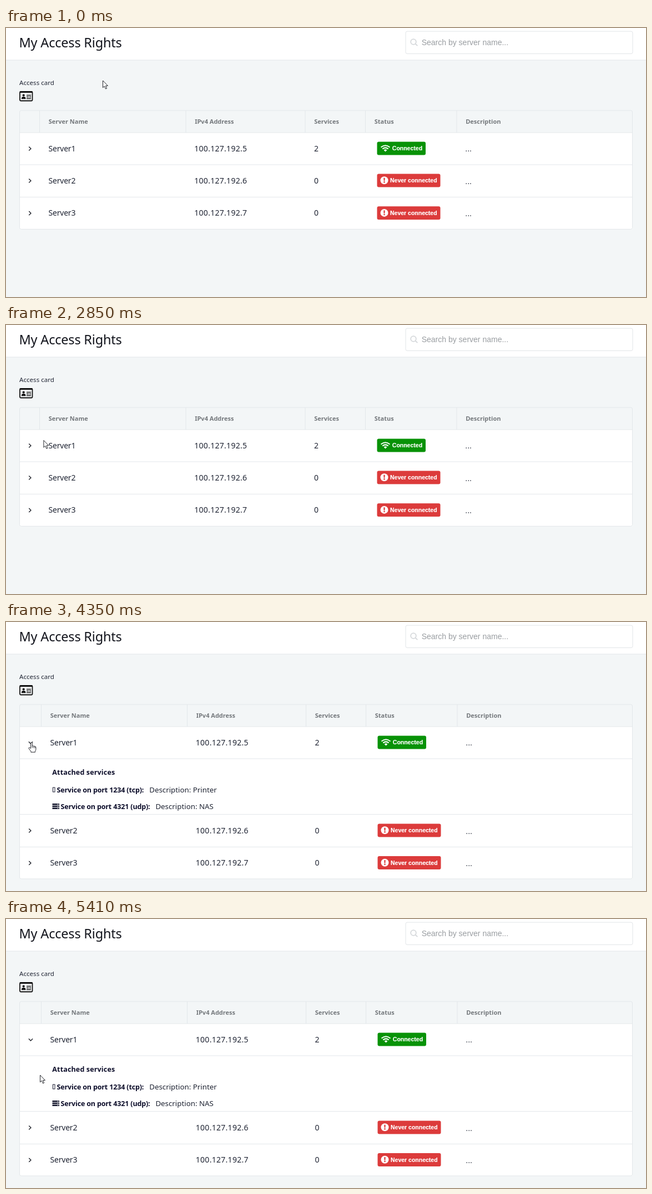
An HTML page that plays this animation: 1153x486 px, repeating every 7.05 s.

```html
<!DOCTYPE html>
<html lang="en">
<head>
<meta charset="utf-8">
<title>My Access Rights</title>
<style>
  html, body { margin: 0; width: 100%; height: 100%; overflow: hidden; background: #f3f6f7; }
  svg { display: block; width: 100%; height: 100%; }
  text { font-family: "Noto Sans", "Open Sans", sans-serif; fill: #1f2433; white-space: pre; }
  .title { font-size: 23.5px; letter-spacing: -.2px; fill: #12141c; }
  .label { font-size: 11.5px; letter-spacing: .05px; }
  .head { font-size: 11px; font-weight: 600; fill: #74787c; }
  .cell { font-size: 14px; letter-spacing: -.2px; }
  .ip { font-size: 14px; letter-spacing: .28px; }
  .dots { font: 14px "Liberation Sans", Arial, sans-serif; }
  .search { font: 14px "Liberation Sans", Arial, sans-serif; fill: #999da1; }
  .badge { font: bold 10.5px "Liberation Sans", Arial, sans-serif; fill: #fff; stroke: #fff; stroke-width: .2px; }
  .strong { font-size: 12.5px; font-weight: 600; letter-spacing: -.15px; fill: #0c0d2a; }
  .lead { font-size: 12.5px; font-weight: 600; letter-spacing: .15px; fill: #0c0d2a; }
  .desc { font-size: 13.3px; }
  .chev { fill: none; stroke: #20232b; stroke-width: 1.4; }
  .line { stroke: #e3e7ea; fill: none; }
  .cursor { fill: #fff; stroke: #23252b; stroke-width: 1; stroke-linejoin: round; }
</style>
</head>
<body>
<svg viewBox="0 0 1153 486" preserveAspectRatio="none">
  <rect width="1153" height="486" fill="#f3f6f7"/>
  <rect width="1153" height="58" fill="#fff"/>
  <path class="line" d="M0 58H1153"/>
  <text class="title" x="23.5" y="35">My Access Rights</text>
  <rect x="720" y="6" width="409" height="40.5" rx="3" fill="#fff" stroke="#e1e4e7"/>
  <g fill="none" stroke="#d5d8db" stroke-width="1.8">
    <circle cx="734" cy="25" r="4.8"/>
    <path d="M737.5 28.5L741.3 32.2"/>
  </g>
  <text class="search" x="748.7" y="31">Search by server name...</text>
  <text class="label" x="24" y="103">Access card</text>
  <g fill="#111">
    <rect x="25" y="115" width="22.5" height="16.5" rx="1.5" fill="#f8fafb" stroke="#111" stroke-width="1.8"/>
    <path d="M25 115.8H47.5" stroke="#111" stroke-width="2.4"/>
    <circle cx="31.7" cy="121.5" r="2.1"/>
    <path d="M27.8 128.2Q27.8 124 31.7 124T35.6 128.2Z"/>
    <path d="M37 121.5H45M37 124.5H41M42 124.5H45M37 127.5H45" stroke="#111" stroke-width="1.3"/>
  </g>
  <g id="table"></g>
  <g id="cursors">
    <path id="arrow" class="cursor" d="M0 0V12.8L2.9 10.1L5 15L7.1 14.1L5.1 9.4H9Z"/>
    <path id="beam" d="M-2.5 -6.5H-.8L0 -6L.8 -6.5H2.5M0 -6V6.5M-2.5 7H-.8L0 6.5L.8 7H2.5" fill="none" stroke="#23252b"/>
    <g id="hand">
      <path class="cursor" d="M-1.3 9.6V1.1Q-1.3 -.4 0 -.4T1.4 1.1V6.1Q2.6 4.9 3.9 6.4Q5.2 5.4 6.2 7Q8 6.5 8 8.6V11.6Q8 13.8 6.6 15.4V17.2H-1V15.6L-4.6 10.9Q-5.6 9.2 -4.2 8.7Q-3 8.4 -1.3 10.6Z"/>
      <path d="M1.4 6V9.4M3.9 6.6V9.6M6.2 7.2V10" fill="none" stroke="#23252b" stroke-width=".9"/>
    </g>
  </g>
</svg>
<script>
const LOOP = 7050, STEP = 1000 / 15, OPEN_AT = 3680;
const HEADS = ["Server Name", "IPv4 Address", "Services", "Status", "Description"];
const MOVES = [
  { at: 1780, steps: 22, path: [[174.5, 95], [134, 195], [45.5, 215]] },
  { at: 4280, steps: 18, path: [[45.5, 215], [51, 258.6], [61.5, 282]] }
];
const $ = id => document.getElementById(id);

const text = (cls, x, y, s) => `<text class="${cls}" x="${x}" y="${y}">${s}</text>`;
const line = d => `<path class="line" d="${d}"/>`;
const chevron = (x, y, turn = 0) =>
  `<path class="chev" transform="translate(${x} ${y}) rotate(${turn})" d="M-1.7 -3.6L1.9 0L-1.7 3.6"/>`;

function badge(x, y, on) {
  const icon = on
    ? `<g fill="none" stroke="#fff" stroke-width="2">
         <path d="M-8 -1.6Q0 -8.4 8 -1.6M-5.2 1.4Q0 -3 5.2 1.4"/></g>
       <path d="M-2.9 3.2Q0 .8 2.9 3.2L0 6.2Z" fill="#fff"/>`
    : `<circle r="7" fill="#fff"/>
       <path d="M-1.3 -4.5H1.3L.9 1H-.9Z" fill="#dc3b3b"/><circle cy="3.2" r="1.3" fill="#dc3b3b"/>`;
  return `<rect x="${x}" y="${y - 12}" width="${on ? 87.5 : 114}" height="24" rx="3" fill="${on ? "#089207" : "#dc3b3b"}"/>
    <g transform="translate(${x + (on ? 15 : 13)} ${y - .3})">${icon}</g>` +
    text("badge", x + (on ? 27.3 : 23.5), y + 3.8, on ? "Connected" : "Never connected");
}

function services() {
  const bars = [329.3, 333, 336.7].map(y =>
    `<path d="M83.5 ${y}H96" stroke="#14162c" stroke-width="2.6"/><path d="M92.5 ${y}H94.5" stroke="#fff"/>`).join("");
  return text("lead", 83.3, 275.8, "Attached services") +
    `<rect x="84.5" y="299" width="3.5" height="8" fill="none" stroke="#14162c"/>` + bars +
    text("strong", 91.5, 307.5, "Service on port 1234 (tcp):") +
    text("desc", 258.2, 307.5, "Description: Printer") +
    text("strong", 98.5, 337.5, "Service on port 4321 (udp):") +
    text("desc", 269.4, 337.5, "Description: NAS");
}

function table(open, turn) {
  const cols = open ? [63.5, 326.5, 540.5, 648.5, 813] : [60.5, 324, 539, 647.5, 812];
  const mids = open ? [217.5, 376.5, 435] : [217.5, 275.5, 334.2];
  const rules = open ? [247, 347.5, 406.5] : [247, 305.5];
  const bottom = open ? 464 : 363.5;
  let s = `<path d="M25 189H1128.5V${bottom}H25Z" fill="#fff"/>
    <rect class="line" x="24.5" y="149" width="1104" height="${bottom - 149}" rx="3"/>`;
  s += [189, ...rules].map(y => line(`M25 ${y}H1128.5`)).join("");
  s += cols.map((x, i) => line(`M${x} 149V189`) + text("head", x + 16.2, 173, HEADS[i])).join("");
  mids.forEach((y, i) => {
    const first = i === 0, base = y + 5;
    s += first && open ? chevron(44.5, y + .5, turn) : chevron(43, y + .5);
    s += text("cell", cols[0] + 16, base, "Server" + (i + 1)) +
      text("ip", cols[1] + 15.3, base, "100.127.192." + (i + 5)) +
      text("cell", cols[2] + 16, base, first ? 2 : 0) +
      badge(cols[3] + 21, y, first) +
      text("dots", cols[4] + 15.3, base + (first ? .2 : 1.2), "...");
  });
  return s + (open ? services() : "");
}

function pointer(t) {
  let pos = MOVES[0].path[0];
  for (const { at, steps, path: [a, b, c] } of MOVES) {
    if (t < at) break;
    const k = Math.min(1, (Math.floor((t - at + 7) / STEP) + 1) / steps);
    const u = k * k * (3 - 2 * k), v = 1 - u;
    pos = a.map((p, i) => v * v * p + 2 * u * v * b[i] + u * u * c[i]);
  }
  return pos;
}

function shape(x, y) {
  const inside = (l, r, top, bot) => x > l && x < r && y > top && y < bot;
  if (inside(38, 51, 208, 227)) return "hand";
  return inside(77, 148, 160, 178) || inside(77, 126, 208, 228) ? "beam" : "arrow";
}

let shown;
function draw(t) {
  const open = t >= OPEN_AT, turn = t < OPEN_AT + 70 ? 45 : 90;
  const state = open ? turn : 0;
  if (state !== shown) {
    $("table").innerHTML = table(open, turn);
    shown = state;
  }
  const [x, y] = pointer(t), kind = shape(x, y);
  for (const id of ["arrow", "beam", "hand"]) $(id).style.display = id === kind ? "" : "none";
  $("cursors").setAttribute("transform", `translate(${x.toFixed(1)} ${y.toFixed(1)})`);
}

const start = performance.now();
function tick() {
  draw((performance.now() - start) % LOOP);
  requestAnimationFrame(tick);
}
tick();
</script>
</body>
</html>
```
